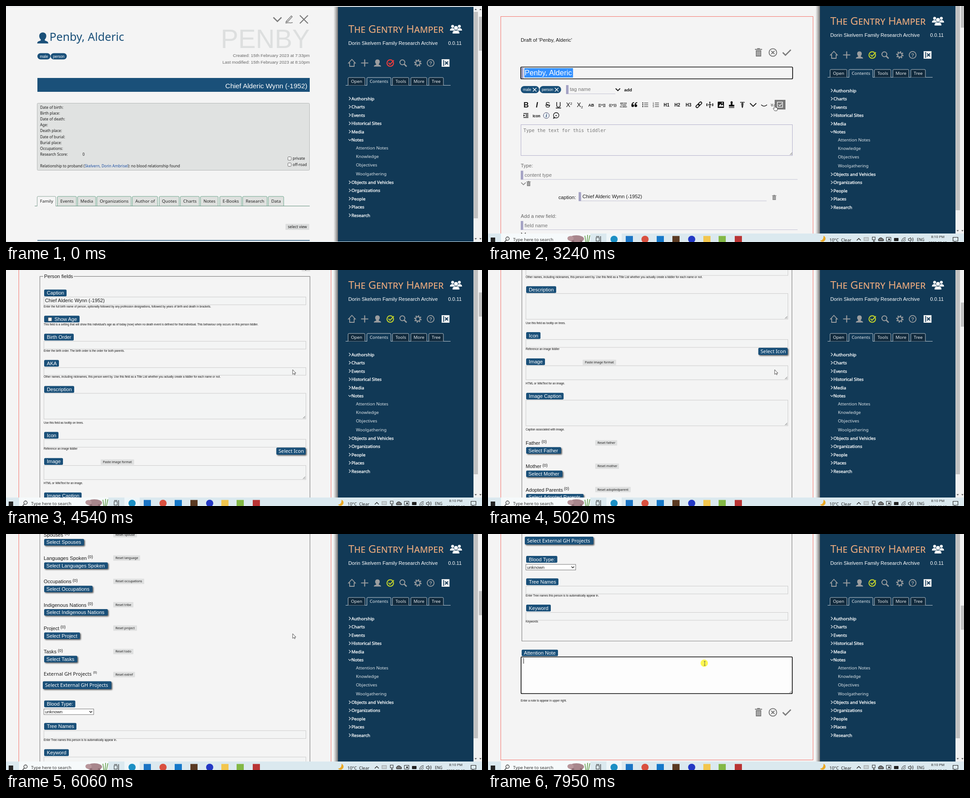
Animation, 1061 px wide and 528 px high, one loop 8 s. Source, as an HTML page:

```html
<!DOCTYPE html>
<html lang="en">
<head>
<meta charset="utf-8">
<title>Family research archive</title>
<style>
html, body { margin: 0; width: 100%; height: 100%; overflow: hidden; background: #f4f4f4; }
svg { display: block; width: 1061px; height: 528px; }
text { white-space: pre; }
.a { font-family: "Liberation Sans", Arial, sans-serif; }
.n { font-family: "Noto Sans", "Open Sans", sans-serif; }
.m { font-family: "DejaVu Sans Mono", monospace; }
.sc { font-variant: small-caps; }
.b { font-weight: bold; }
.mid { text-anchor: middle; }
.end { text-anchor: end; }
.sh { filter: drop-shadow(2px 2px 1.5px rgba(0,0,0,.6)); }
</style>
</head>
<body>
<svg id="stage" viewBox="0 0 1061 528" xmlns="http://www.w3.org/2000/svg"></svg>
<script>
const NAVY = '#1a5079', GREY = '#7b7b7b', BAR = 'var(--bar)', HINT = '#757575';
const PERSON = 'Penby, Alderic', CAPTION = 'Chief Alderic Wynn (-1952)';

// Drawing helpers
const text = (x, y, s, size = 11.15, fill = '#1a1a1a', cls = 'a', more = '') =>
  `<text x="${x}" y="${y}" font-size="${size}" fill="${fill}" class="${cls}" ${more}>${s}</text>`;
const box = (x1, y1, x2, y2, fill = 'none', line = 'none', r = 0, w = 1) =>
  `<rect x="${x1}" y="${y1}" width="${x2 - x1}" height="${y2 - y1}" rx="${r}" fill="${fill}" stroke="${line}" stroke-width="${w}"/>`;
const path = (d, line = GREY, w = 2, fill = 'none') =>
  `<path d="${d}" stroke="${line}" stroke-width="${w}" fill="${fill}"/>`;
const disc = (x, y, r, fill, line = 'none', w = 1) =>
  `<circle cx="${x}" cy="${y}" r="${r}" fill="${fill}" stroke="${line}" stroke-width="${w}"/>`;
const at = (x, y, s, k = 1) => `<g transform="translate(${x} ${y}) scale(${k})">${s}</g>`;
const group = (id, s) => `<g id="${id}">${s}</g>`;
const small = (x, y, s, cls = 'n') => text(x, y, s, 8.35, '#1a1a1a', cls);

const head = c => path('M-8.500 8.500c0-5 6-3 5.500-6c-4-4-3-11 3-11s7 7 3 11c-.5 3 5.500 1 5.500 6z', 'none', 0, c);
const chevron = (x, y, c, w = 2, r = 5) => path(`M${x - r} ${y - r / 2}L${x} ${y + r / 2}L${x + r} ${y - r / 2}`, c, w);
const bin = path('M-8 -7H8M-3 -8.500H3', GREY, 2) + box(-6, -5, 6, 9, GREY) +
  path('M-3 -3V7M0 -3V7M3 -3V7', '#f4f4f4', 1);
const trash = (x, y, k = 1) => at(x, y, bin, k);
const cross = r => `M${-r} ${-r}L${r} ${r}M${r} ${-r}L${-r} ${r}`;
const editIcons = y => trash(603, y) +
  at(635, y, disc(0, 0, 8.5, 'none', GREY, 2) + path(cross(3.5), GREY, 2.2)) +
  path(`M657 ${y}L663 ${y + 6}L675 ${y - 6}`, GREY, 2.8);
const grip = (x, y) => path(`M${x - 6} ${y - 1}L${x - 1} ${y - 6}M${x - 3} ${y - 1}L${x - 1} ${y - 3}`, '#555', .9);

// Tiddler in view mode
function viewPage() {
  const labels = ['Date of birth:', 'Birth place:', 'Date of death:', 'Age:', 'Death place:',
    'Date of burial:', 'Burial place:', 'Occupations:', 'Research Score:'];
  const tabs = [['Events', 115, 157], ['Media', 160, 200], ['Organizations', 203, 279], ['Author of', 282, 338],
    ['Quotes', 342, 386], ['Charts', 389, 431], ['Notes', 434, 473], ['E-Books', 477, 525],
    ['Research', 528, 582], ['Data', 585, 619]];
  let s = text(677, 94, 'PENBY', 58.5, '#dddfdf', 'a end');
  s += chevron(605, 30, GREY, 2.6, 9);
  s += path('M625 34L636 22L638 24L628 35L624 36ZM623 38.500C630 36 632 39 639 37', GREY, 1.5);
  s += at(664, 30, path(cross(9), GREY, 2.4));
  s += at(82, 71.5, head(NAVY), 1.45) + text(97, 78, PERSON, 25.2, NAVY, 'n');
  s += box(70, 105.5, 99, 119.5, NAVY, 'none', 7) + text(84.5, 115.5, 'male', 8.35, '#fff', 'a mid');
  s += box(99.5, 105.5, 135.5, 119.5, NAVY, 'none', 7) + text(117.5, 115.5, 'person', 8.35, '#fff', 'a mid');
  s += text(677, 114, 'Created: 15th February 2023 at 7:33pm', 9.75, '#666', 'a end');
  s += text(677, 128.5, 'Last modified: 15th February 2023 at 8:10pm', 9.75, '#666', 'a end');
  s += box(70, 161, 677, 192, NAVY) + text(671.5, 184, CAPTION, 15.3, '#fff', 'a end');
  s += box(69.5, 217.5, 676.5, 367.5, '#e0e2e1', '#b5b8b7', 2);
  labels.forEach((l, i) => s += small(76, 230 + i * 13.1, l));
  s += small(170.5, 335, '0');
  s += small(76, 361, 'Relationship to proband (<tspan fill="#1d4fa3">Skelvern, Dorin Ambrisel</tspan>): no blood relationship found');
  ['private', 'off-road'].forEach((l, i) => {
    const y = 337 + i * 13.7;
    s += box(628.5, y + .5, 635.5, y + 8, '#fff', '#666', 1) + small(639, y + 7, l);
  });
  s += path('M64 447.500H677', '#63907d', 1);
  tabs.forEach(([l, a, b]) => s += path(`M${a - .5} 447V428q0-2 2-2H${b - 2}q2 0 2 2V447`, '#6ba58b', 1, '#dfe1df') +
    text((a + b) / 2, 440, l, 9.75, '#222', 'n mid'));
  s += path('M69.500 448V428q0-2 2-2H109q2 0 2 2V448', '#8aa59a', 1, '#f5f5f5') + text(90.5, 440, 'Family', 9.75, '#222', 'n mid');
  s += box(623, 487.5, 676, 501, '#dddede', 'none', 1) + text(649.5, 497.3, 'select view', 8.4, '#1a1a1a', 'n mid');
  return at(0, -18, s + box(70, 523.7, 677, 525.2, NAVY));
}

// Editor parts
const chip = (y, label, right, x = 85) => box(x, y, right, y + 15.2, NAVY, 'none', 2.5) + text(x + 6, y + 11.6, label, 11.15, '#fff');
const input = (y1, y2) => box(84.5, y1 + .5, 668.5, y2 + .5, '#f3f4f4', '#ccc');
const area = (y1, y2) => input(y1, y2) + grip(668, y2);
const hint = (y, s, x = 84) => text(x, y, s, 6.27, '#111');
const barField = (y, label, right, x = 73, dy = 13) => box(x, y, x + 5.5, y + 20, BAR) +
  path(`M${x + 5} ${y + 19.500}H${right}`, '#c3c2d4', 1) + text(x + 8.5, y + dy, label, 11.15, HINT);
const reset = (x, y, right, s) => box(x, y, right, y + 12, '#dfe0e0', 'none', 1) + text(x + 5, y + 8.4, s, 6.97, '#1a1a1a', 'n');
const button = (x, y, right, h, s, cls = 'a') => `<g class="sh">${box(x, y, right, y + h, NAVY, 'none', 2.5)}</g>` +
  text(x + 5, y + h / 2 + 4, s, 11.15, '#fff', cls);

function toolbar() {
  const ink = '#111';
  const words = [[398, 'H1'], [422, 'H2'], [447, 'H3']];
  const it = (x, s, more, cls = 'a mid', z = 16) => text(x, 226.5, s, z, ink, cls, more);
  let s = it(85, 'B', '', 'a mid b') + it(109, 'I', 'font-style="italic"', 'a mid b') +
    it(133, 'S', 'text-decoration="line-through"') + it(157, 'U', 'text-decoration="underline"') +
    text(174, 226, 'X<tspan dy="-5" font-size="8">2</tspan>', 14, ink) +
    text(198, 226, 'X<tspan dy="3" font-size="8">2</tspan>', 14, ink) +
    text(230, 224.5, 'AB', 9, ink, 'a mid b') + text(254, 224, '[[+]]', 8, ink, 'a mid b') + text(278, 224, '{{+}}', 8, ink, 'a mid b');
  ['ABCDE', 'FGHIJ', 'KLMNO'].forEach((l, i) => s += text(302, 219.3 + i * 4, l, 4.2, ink, 'a mid b'));
  [320, 327].forEach(x => s += path(`M${x + 5.500} 215c-4 0-6 4-6 8a3 3 0 1 0 3-3c0-2 1-3 3-3z`, 'none', 0, ink));
  [217, 221, 225].forEach((y, i) => s += disc(345, y, 1.2, ink) + path(`M348 ${y}H357M372 ${y}H381`, ink, 1.2) +
    text(368.5, y + 1.7, i + 1, 5, ink, 'a mid'));
  words.forEach(([x, l]) => s += text(x, 225, l, 10, ink, 'a mid b'));
  s += at(470, 221, `<g transform="rotate(-45)">${box(-8, -2.5, 1, 2.5, 'none', ink, 2.5, 1.8)}${box(-1, -2.5, 8, 2.5, 'none', ink, 2.5, 1.8)}</g>`);
  s += path('M494.500 214V219M494.500 223V228M488 218V224M501 218V224M491 221H498', ink, 2);
  s += box(512, 214, 526, 228, ink, 'none', 1) + path('M514 225L518 219L521 223L523 220L525 225Z', 'none', 0, '#fff') + disc(522, 217, 1.3, '#fff');
  s += path('M541 221V217a2.500 2.500 0 1 1 4 0V221H549V225H537V221ZM537 226.500H549V228H537Z', 'none', 0, ink);
  s += path('M562 215.500H572M564 219H570M564.500 222H569.500M565 225H569M567 215V228', ink, 1.6);
  s += chevron(591, 221, ink, 1.8, 7) + path('M609 221Q615 227 622 221', ink, 1.6) + chevron(633, 220, ink, 1, 2.5) + chevron(633, 223, ink, 1, 2.5);
  s += group('hot', box(639, 210, 663, 231.5, '#777'));
  s += '<g id="task" fill="none" stroke-width="1.4"><rect x="645" y="215" width="11.5" height="11.5"/><path d="M648 220.500L650.500 223L655 218"/></g>';
  s += path('M79 240.500H90M84 243.500H90M84 246.500H90M79 249.500H90', ink, 1.5) + path('M79 242.500L82.500 245L79 247.500Z', 'none', 0, ink);
  s += text(108, 249, 'Icon', 8.35, ink, 'a mid b');
  s += disc(130, 245, 6.5, '#eef3f8', '#446', 1) + text(130, 249, 'i', 11, '#246', 'a mid b', 'font-style="italic"');
  return s + disc(152, 244.5, 6, 'none', ink, 1.3) + path('M147 248L146 251.500L150 250', ink, 1.3) + text(152, 249.5, '❞', 8, ink, 'a mid');
}

function draftPage() {
  let s = box(28.5, 23.5, 724.5, 2146.5, '#f4f4f4', '#f4726a') + text(73, 79.5, `Draft of '${PERSON}'`) + editIcons(104);
  s += box(73, 136.5, 679, 163, '#f5f5f5', '#111', 2, 1.7) + box(74, 138, 79, 162, BAR) +
    box(81, 139, 189.5, 160, '#3390ff') + text(81.5, 155.3, PERSON, 16.72, '#fff');
  [['male', 73, 114], ['person', 115, 163]].forEach(([l, a, b]) => s += box(a, 179, b, 195, NAVY, 'none', 8) +
    text(a + 5, 190, l, 8.35, '#fff') + at(b - 10, 187.3, path(cross(4), '#fff', 1.3)));
  s += barField(177, 'tag name', 284, 174) + chevron(289.5, 187, '#111', 1.8) + text(303.5, 190.5, 'add', 9.75, '#111', 'a b');
  s += toolbar() + box(73.5, 265.5, 678.5, 334.5, '#f4f4f4', '#b3b0cc') +
    text(79, 282, 'Type the text for this tiddler', 10.2, HINT, 'm') + grip(679, 334);
  s += text(73, 361, 'Type:', 11.15, '#666') + barField(368.5, 'content type', 690) + chevron(79, 397.5, GREY, 1.5) + trash(90.5, 397.5, .6);
  s += text(157, 432, 'caption:') + barField(416.5, '', 621, 202) + text(210.5, 430, CAPTION) + trash(638, 428.5, .6);
  s += text(73, 473.5, 'Add a new field:', 11.15, '#666') + barField(481, 'field name', 690, 73, 13.5) + chevron(79, 510, '#111', 1.7);
  s += barField(520.5, 'field value', 314) + box(314.5, 520.5, 348, 540.5, '#e1e1e1', 'none', 1) + text(331, 534, 'add', 9.75, '#111', 'a b mid');
  s += box(659, 542, 678, 555, '#dfdfdf') + path('M664 545H672', '#222', 1.2) + chevron(668, 548, '#222', 1.1, 3) + chevron(668, 551, '#222', 1.1, 3);
  s += path('M83 566.500H75.500V1880.500H677.500V566.500H151', '#858585', 1.2) + text(85, 570, 'Person fields');
  return s + personFields() + closing();
}

function personFields() {
  let s = chip(596, 'Caption', 135) + input(612, 629.5) + text(87, 624, CAPTION) +
    hint(636, 'Enter the full birth name of person, optionally followed by any profession designations, followed by years of birth and death in brackets.');
  s += chip(654.3, '', 164) + box(94, 658.5, 102, 666.5, '#fff', '#666', 1) + text(108, 666, 'Show Age', 11.15, '#fff') +
    hint(676, "This field is a setting that will show this individual's age as of today (now) when no death event is defined for that individual. This behaviour only occurs on this person tiddler.");
  s += chip(694.7, 'Birth Order', 151) + input(711, 728.5) + hint(735, 'Enter the birth order. The birth order is the order for both parents.');
  s += chip(753.3, 'AKA', 118) + input(770, 787) +
    hint(793, 'Other names, including nicknames, this person went by. Use this field as a Title List whether you actually create a tiddler for each name or not.');
  s += chip(811.7, 'Description', 152) + area(827.5, 885) + hint(896, 'Use this field as tooltip on trees.');
  s += chip(914.3, 'Icon', 117) + input(930.5, 948) + hint(954, 'Reference an image tiddler') + button(602.5, 949.3, 668, 16, 'Select Icon', 'n');
  s += chip(973, 'Image', 127) + reset(211, 976, 285.5, 'Paste image format') + area(989, 1020.5) + hint(1031, 'HTML or WikiText for an image.');
  s += chip(1050, 'Image Caption', 168.5) + area(1066, 1123.5) + hint(1134, 'Caption associated with image.');
  const links = [['Father', 'father', 120, 163, 288], ['Mother', 'mother', 122, 166, 292], ['Adopted Parents', 'adoptedparent', 170, 213, 318],
    ['Spouses', 'spouse', 131, 174, 292], ['Languages Spoken', 'language', 183, 227, 299], ['Occupations', 'occupations', 149, 193, 308],
    ['Indigenous Nations', 'tribe', 183, 227, 284], ['Project', 'project', 122, 165, 292], ['Tasks', 'todo', 116, 159, 284]];
  links.forEach(([l, key, sup, right, end], i) => {
    const y = 1162 + i * 52.3;
    s += text(84, y + 4.3, l) + text(sup - .5, y + .8, '(0)', 9.3) + reset(239, y - 6, end, 'Reset ' + key) +
      button(85, y + 9.7, right, 14.6, 'Select ' + l);
  });
  s += text(84, 1634.5, 'External GH Projects', 11.15, '#1a1a1a', 'n') + text(194.5, 1630, '(0)', 6.97, '#1a1a1a', 'n') +
    reset(239, 1626, 287.5, 'Reset extref') + button(82, 1647, 235, 17.5, 'Select External GH Projects', 'n');
  s += chip(1690, 'Blood Type:', 154.5) + box(84.5, 1709, 195.5, 1721.5, '#fff', '#777') +
    text(87, 1718.7, 'unknown', 9.75) + chevron(189, 1715.3, '#222', 1.4, 3);
  s += chip(1740.3, 'Tree Names', 157) + input(1757, 1774.5) + hint(1780.5, 'Enter Tree names this person is to automatically appear in.');
  return s + chip(1799, 'Keyword', 140) + input(1816, 1833.5) + hint(1839, 'Keywords');
}

function closing() {
  return box(75, 1899.7, 156, 1914.3, NAVY, 'none', 2.5) + text(80, 1911, 'Attention Note', 11.15, '#fff') +
    box(73.5, 1915.5, 678.5, 1998.5, '#f4f4f4', '#ccc') +
    group('focus', box(73.7, 1916, 678.3, 1998, '#fdfdfd', '#111', 2, 1.7) + path('M79.500 1918.500V1931', '#222', 1)) +
    grip(678, 1998) + hint(2015.5, 'Enter a note to appear in upper right.', 73) + editIcons(2040);
}

function sidebar() {
  const grey = '#9b9d9f', pale = '#e6ebee', deep = '#113956';
  const tabs = [['Open', 763, 800], ['Tools', 862, 898], ['More', 903, 938], ['Tree', 943, 975]];
  const menu = [['Authorship', 189], ['Charts', 207.5], ['Events', 226], ['Historical Sites', 244.5], ['Media', 263], ['Notes', 281.5],
    ['Objects and Vehicles', 376.5], ['Organizations', 394.7], ['People', 413], ['Places', 431.5], ['Research', 450]];
  const notes = [['Attention Notes', 299.5], ['Knowledge', 318.5], ['Objectives', 337.5], ['Woolgathering', 357]];
  let s = box(730, -16, 741, 509, 'url(#edge)') + box(740, -16, 1042, 509, deep);
  s += text(763, 42.3, 'The Gentry Hamper', 24.2, '#e6a87d', 'n sc');
  s += [995.5, 1010.5].map(x => disc(x, 27.5, 3.2, '#fff') +
    path(`M${x - 6} 37q0-5.500 6-5.500t6 5.500z`, 'none', 0, '#fff')).join('');
  s += disc(1003, 31, 4.8, '#fff', deep, 1) + path('M995 44v-2q0-5.500 8-5.500t8 5.500v2z', deep, .8, '#fff');
  s += text(763, 68.8, 'Dorin Skelvern Family Research Archive', 11.15, '#fff') + text(985.5, 68.8, '0.0.11', 11.15, '#fff');
  s += at(771, 109.5, path('M-7.500 0L0 -8L7.500 0H5V7.500H-5V0Z', grey, 1.8)) + at(799.5, 109.5, path('M0 -8V8M-8 0H8', grey, 2.2)) + at(828, 109.5, head(grey), .95);
  s += '<g id="saved" fill="none" stroke-width="2.2"><circle cx="856.5" cy="109.7" r="7.3"/><path d="M852.500 109L856 112.500L864.500 103.500"/></g>';
  s += at(885, 109.5, disc(-1.5, -1.5, 5.5, 'none', grey, 2) + path('M2.500 2.500L8 8', grey, 2.8));
  s += at(918, 109.5, disc(0, 0, 4.8, 'none', grey, 2.2) + `<circle r="7" fill="none" stroke="${grey}" stroke-width="2.6" stroke-dasharray="2.75"/>`);
  s += disc(946.5, 109.5, 7.6, 'none', grey, 1.8) + text(946.5, 113.7, '?', 11.5, grey, 'a b mid');
  s += box(971, 101, 988.5, 118, '#f4f4f4') + path('M975.500 103V116', deep, 1.8) + at(982, 109.5, path(cross(3.3), deep, 2.2));
  s += path('M757 159.500H805M858 159.500H991', '#b9c4cc', 1) + path('M804.500 160V144q0-2 2-2H856q2 0 2 2V160', '#cbd3d9', 1);
  tabs.forEach(([l, a, b]) => s += path(`M${a - .5} 159.500V144q0-2 2-2H${b - 2}q2 0 2 2V159.500`, '#b9c4cc', 1, '#10293c') +
    text((a + b) / 2, 153.7, l, 9.75, pale, 'n mid'));
  s += text(831.3, 153.7, 'Contents', 9.75, pale, 'n mid');
  menu.forEach(([l, y]) => s += (l === 'Notes' ? chevron(766.5, y, pale, 1.2, 3.2) : path(`M764.500 ${y - 3.500}L768 ${y}L764.500 ${y + 3.500}`, pale, 1.2)) +
    text(770, y + 3.5, l, 9.75, pale, 'n', `stroke="${pale}" stroke-width=".5"`));
  notes.forEach(([l, y]) => s += text(780, y + 3.5, l, 9.75, '#dde4e8', 'n'));
  s += box(1042, -16, 1061, 509, '#f1f1f1') + box(1042.5, -5, 1052, 457, '#c1c1c1');
  s += '<rect id="thumb" x="1054" width="7" fill="#c1c1c1"/>';
  [1047, 1057.5].forEach(x => s += path(`M${x - 2.500} 501.500h5l-2.500 3zM${x - 2.500} -9h5l-2.500 -3z`, 'none', 0, '#505050'));
  return s;
}

function taskbar() {
  const ink = '#222';
  const apps = [[281, '#1b8fc4', 1], [315, '#1a74c4'], [350, '#d9503f', 1], [384, '#1578c9'], [419, '#5a3a22'],
    [454, '#2338c4', 1], [488, '#f2c64e'], [522, '#83b845'], [558, '#b93434']];
  let s = box(0, 509, 1061, 550, '#dbe9ef') + box(29, 509, 228, 550, '#f6fafb') + box(264, 509, 298, 550, '#eef6f9') + box(6, 518, 16, 528, ink);
  s += disc(43.5, 520.5, 3.8, 'none', ink, 1.2) + path('M41 523.500L37 528', ink, 1.3) + text(56, 526, 'Type here to search', 9.75, '#333', 'n');
  s += '<ellipse cx="197" cy="521" rx="17" ry="8" fill="#a8868c"/><ellipse cx="184" cy="520" rx="7" ry="5.5" fill="#b8969b"/>' +
    box(187, 524, 192, 530, '#8f6f76') + box(205, 524, 210, 530, '#8f6f76');
  s += path('M218 528L216 514M221 528L222 512M224 528L227 513', '#5f9b48', 1.6);
  s += box(241, 518, 248, 526, 'none', ink) + path('M241 515.500H248M251 515V528', ink, 1.2);
  apps.forEach(([x, c, round]) => s += round ? disc(x, 522, 8, c) : box(x - 8, 514.5, x + 8, 531, c));
  s += path('M748 514a7 7 0 1 1 -8 11q8 0 8 -11z', 'none', 0, '#e9a825') + text(761, 526.5, '10°C  Clear', 9.5, ink, 'n');
  s += path('M822 524.500L826.500 520L831 524.500', ink, 1.3);
  s += box(838, 518, 848, 525, '#c8d2d6', '#999') + box(856.5, 517, 863, 523, 'none', ink) + path('M858 526H863M860 523V528', ink, 1);
  s += path('M871 525.500a3 3 0 0 1 1-5a4 4 0 0 1 7 0a3 3 0 0 1 2 5z', ink, 1.1, '#777') + box(888, 517.5, 898, 526, 'none', ink) + disc(894, 522, 2, ink);
  s += box(905, 519, 915, 526, ink, 'none', 1) + path('M922 527q0-8 9-9M925 527q0-5 6-6M928 527q0-2 3-3', ink, 1);
  s += path('M937 520.500H939L942 518V527L939 524.500H937ZM944 520q2 2.500 0 5M946.500 518q3 4.500 0 9', ink, 1);
  s += text(956, 526, 'ENG', 8.2, ink, 'n') + text(1002.5, 518.8, '8:10 PM', 7.9, ink, 'n mid') + text(1002.5, 531.5, '2023-02-15', 7.9, ink, 'n mid');
  return s + path('M1036.500 517.500H1047.500V526H1043L1040 529V526H1036.500Z', ink, 1.1);
}

const cursors = group('halo', disc(-1, -.5, 8.2, '#fcf750')) +
  group('arrow', path('M0 0V10.500L2.500 8.300L4.200 11.500L5.700 10.800L4.200 7.700H7.200Z', '#222', .8, '#fff')) +
  group('hand', path('M-1 6V-1a1.100 1.100 0 0 1 2.200 0V3.500L5 4.500q1.500.5 1.200 2.500L5 11.500H0L-3.500 6.500q.5-1.500 2.500 0z', '#222', .8, '#fff')) +
  group('beam', path('M-2 -4.500H2M0 -4.500V4.500M-2 4.500H2', '#555', .9));

const stage = document.getElementById('stage');
stage.innerHTML = '<defs><linearGradient id="edge"><stop offset="0" stop-color="#777" stop-opacity="0"/><stop offset="1" stop-color="#666"/></linearGradient></defs>' +
  group('camera', box(0, -18, 1061, 509, '#f4f4f4') + group('view', viewPage()) + group('draft', draftPage()) + sidebar() +
    box(0, -18, 1061, -16.8, '#fff') + box(0, -17, 1061, -16, '#d5d9dc') + taskbar() + group('cursor', cursors));

// Timing tables: [ms, values...]
const LOOP = 8000, OPEN = 2600, FOCUS = 7950, SCROLL = 3510;
const pan = [[30, 18], [250, 14], [600, 4], [830, 0]];
const scroll = [[SCROLL, 0], [4060, 331], [4300, 440], [5020, 775], [5200, 840], [5560, 1155], [5810, 1270],
  [5960, 1270], [6570, 1557], [6690, 1602], [6900, 1602], [6990, 1641]];
const pointer = [[300, 1075, 540], [830, 789, 253], [890, 706, 101], [1040, 706, 101], [1750, 630, 12],
  [2640, 630, 12], [3200, 639, 223], [7250, 639, 223], [7710, 483, 289.5]];

function sample(keys, t) {
  const i = keys.findIndex(k => k[0] > t);
  if (i === 0) return keys[0].slice(1);
  if (i < 0) return keys[keys.length - 1].slice(1);
  const a = keys[i - 1], b = keys[i], f = (t - a[0]) / (b[0] - a[0]);
  return a.slice(1).map((v, j) => v + (b[j + 1] - v) * f);
}
const ease = t => { const k = Math.min(1, Math.max(0, t)); return k * k * (3 - 2 * k); };
const el = id => document.getElementById(id);
const set = (id, name, v) => el(id).setAttribute(name, v);
const show = (id, on) => set(id, 'visibility', on ? 'visible' : 'hidden');

function draw(t) {
  const [lift] = sample(pan, t), [s] = sample(scroll, t), [x, y] = sample(pointer, t);
  const k = ease((t - OPEN) / 440);
  set('camera', 'transform', `translate(0 ${lift})`);
  set('view', 'transform', `translate(${-740 * k} ${-22 * k})`);
  set('view', 'opacity', 1 - k);
  show('view', k < 1);
  set('draft', 'transform', `translate(0 ${-s})`);
  set('draft', 'opacity', k);
  stage.style.setProperty('--bar', t < SCROLL ? '#a4a2c4' : '#b3b3b3');
  set('thumb', 'y', 6 + (-11.5 + .101 * s) * k);
  set('thumb', 'height', 76 - 22 * k);
  set('saved', 'stroke', t < 2240 ? '#f03c3c' : '#bfd02c');

  const onTool = t >= 3180 && t < SCROLL, beam = t >= 7350;
  show('hot', onTool);
  set('task', 'stroke', onTool ? '#fff' : '#111');
  show('focus', t >= FOCUS);
  set('cursor', 'transform', `translate(${x} ${y})`);
  const onPencil = t >= 1700 && t < 2700;
  show('hand', onTool || onPencil);
  show('beam', beam);
  show('arrow', t >= 300 && !onTool && !onPencil && !beam);
  show('halo', t >= FOCUS || (t >= 1990 && t < 2240));
}

const start = performance.now();
function tick() {
  draw((performance.now() - start) % LOOP);
  requestAnimationFrame(tick);
}
tick();
</script>
</body>
</html>
```
